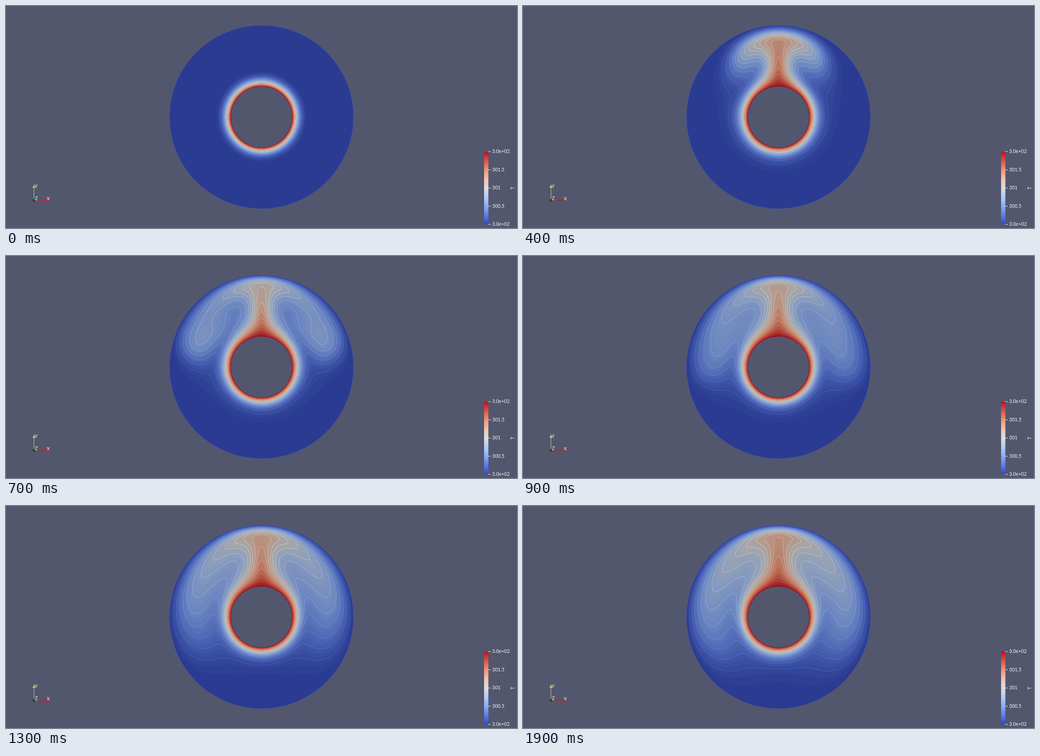
An HTML page with a canvas that plays this animation: 1133x494 px, repeating every 2000 ms.

```html
<!DOCTYPE html>
<html lang="en">
<head>
<meta charset="utf-8">
<title>Natural convection in an annulus</title>
<style>
  html, body { margin: 0; width: 100%; height: 100%; overflow: hidden; background: #52576e; }
  canvas, svg { position: absolute; left: 0; top: 0; display: block; }
  text { font: 10.6px Lato, "Open Sans", sans-serif; fill: #f4f4f6; }
</style>
</head>
<body>
<canvas id="stage" width="1133" height="494"></canvas>
<svg width="1133" height="494" viewBox="0 0 1133 494">
  <g id="bar"></g>
  <text transform="translate(1127 408.4) rotate(-90)">T</text>
  <g stroke-width="1">
    <path d="M62 432V404" stroke="#c9c9a4"/>
    <path d="M62 432.5H91" stroke="#d01818"/>
  </g>
  <path d="M62 397.5L65 404.5H59Z" fill="#e6dc14"/>
  <path d="M97.5 432.5L89 429.5V435.5Z" fill="#c01414"/>
  <circle cx="62" cy="432.5" r="3.2" fill="#0c5a1c"/>
  <text x="63.5" y="405">Y</text>
  <text x="90.3" y="433">X</text>
  <text x="64" y="432">Z</text>
</svg>
<script>
const CX = 566.5, CY = 247, R_IN = 68, R_OUT = 204;
const FRAMES = 20, HOLD = 100;

// Grid in (ln r, angle from the top); both directions share the spacing h.
const M = 42, N = 120, S = N + 1, K = 40, h = Math.PI / N;
const PR = 0.7, RAYLEIGH = 4000, G = RAYLEIGH * PR, DT = 1.5e-4;
const SIZE = (M + 1) * S;
const grid = () => new Float64Array(SIZE);
const radius = Float64Array.from({ length: M + 1 }, (_, i) => Math.exp(i * h));
const sines = Array.from({ length: K }, (_, k) =>
  Float64Array.from({ length: S }, (_, j) => Math.sin((k + 1) * j * h)));
const cosine = Float64Array.from({ length: S }, (_, j) => Math.cos(j * h));

// Tridiagonal factors for every angular mode.
const factors = sines.map((_, k) => {
  const d = 2 + ((k + 1) * h) ** 2, f = new Float64Array(M + 1);
  for (let i = 1; i < M; i++) f[i] = -1 / (d + f[i - 1]);
  return f;
});

let temp, tempNext, vort, vortNext, psi;

function reset() {
  [temp, tempNext, vort, vortNext, psi] = Array.from({ length: 5 }, grid);
  temp.fill(1, 0, S);
  tempNext.fill(1, 0, S);
}

// Stream function from vorticity: sine series in angle, direct solve in ln r.
const coef = new Float64Array(M + 1);
function solvePsi() {
  psi.fill(0);
  for (let k = 0; k < K; k++) {
    const sn = sines[k], f = factors[k];
    coef[0] = coef[M] = 0;
    for (let i = 1; i < M; i++) {
      let sum = 0;
      const row = i * S;
      for (let j = 1; j < N; j++) sum += sn[j] * vort[row + j];
      const b = -sum * radius[i] ** 2 * h * h * 2 / N;
      coef[i] = (b - coef[i - 1]) * f[i];
    }
    for (let i = M - 1; i > 0; i--) {
      const a = coef[i] -= f[i] * coef[i + 1], row = i * S;
      for (let j = 1; j < N; j++) psi[row + j] += a * sn[j];
    }
  }
}

function step() {
  const last = M * S, sn = sines[0];
  for (let j = 1; j < N; j++) {
    vort[j] = -2 * psi[S + j] / (h * h);
    vort[last + j] = -2 * psi[last - S + j] / (h * radius[M]) ** 2;
  }
  for (let i = 1; i < M; i++) {
    const g = DT / (radius[i] * h) ** 2, lift = DT * G / (radius[i] * h);
    for (let j = 0; j <= N; j++) {
      const c = i * S + j, up = c + S, dn = c - S;
      const lo = j ? c - 1 : c + 1, hi = j < N ? c + 1 : c - 1;
      const px = (psi[up] - psi[dn]) / 2;
      const pt = j === 0 ? psi[hi] : j === N ? -psi[lo] : (psi[hi] - psi[lo]) / 2;
      const tx = (temp[up] - temp[dn]) / 2, tt = (temp[hi] - temp[lo]) / 2;
      const lapT = temp[up] + temp[dn] + temp[hi] + temp[lo] - 4 * temp[c];
      tempNext[c] = temp[c] + g * (px * tt - pt * tx + lapT);
      if (j === 0 || j === N) continue;
      const wx = (vort[up] - vort[dn]) / 2, wt = (vort[hi] - vort[lo]) / 2;
      const lapW = vort[up] + vort[dn] + vort[hi] + vort[lo] - 4 * vort[c];
      vortNext[c] = vort[c] + g * (px * wt - pt * wx + PR * lapW)
        - lift * (tx * sn[j] + tt * cosine[j]);
    }
  }
  [temp, tempNext] = [tempNext, temp];
  [vort, vortNext] = [vortNext, vort];
  solvePsi();
}

// Pixel radius of the outermost 5 % isotherm along one ray.
function reach(j) {
  let i = M - 1;
  while (i > 0 && temp[i * S + j] < 0.05) i--;
  const a = temp[i * S + j], b = temp[(i + 1) * S + j];
  return R_IN * Math.exp((i + (a - 0.05) / (a - b)) * h);
}

function simulate() {
  // Pace: heat first spreads to r = 94 at the side, two intervals later the plume is at r = 146.
  reset();
  let n = 0;
  while (n < 220 && !(reach(N / 2) >= 94)) { step(); n++; }
  const first = n;
  while (n < first + 600 && !(reach(0) >= 146)) { step(); n++; }
  const gap = Math.max(80, Math.round((n - first) / 2));

  reset();
  const out = [];
  for (let f = 0; f < FRAMES; f++) {
    for (let k = f ? gap : first; k > 0; k--) step();
    out.push(Float32Array.from(temp));
  }
  return out;
}

// Cool-to-warm colour scale.
const scale = [
  [56, 78, 192], [98, 130, 234], [141, 176, 254], [184, 208, 249], [221, 221, 221],
  [244, 196, 173], [244, 154, 123], [224, 92, 74], [204, 18, 38]
];
function colour(t) {
  const p = Math.min(Math.max(t, 0), 1) * 8, i = Math.min(7, Math.floor(p));
  return scale[i].map((v, n) => v + (scale[i + 1][n] - v) * (p - i));
}
const ramp = (count) => Array.from({ length: count }, (_, i) => colour(i / (count - 1)));
const BANDS = 64, LEVELS = 20, SHADE = 0.755;
const bands = ramp(BANDS).map((c) => c.map((v) => v * SHADE));
const lineColours = ramp(LEVELS + 1);

// Grid position of every pixel in the square around the ring.
const W = 413, X0 = 360, Y0 = 41;
const ringU = new Float32Array(W * W), ringV = new Float32Array(W * W);
for (let y = 0, p = 0; y < W; y++) {
  for (let x = 0; x < W; x++, p++) {
    const dx = X0 + x + 0.5 - CX, dy = Y0 + y + 0.5 - CY;
    const u = Math.log(Math.max(1, Math.hypot(dx, dy) / R_IN)) / h;
    ringU[p] = Math.min(u, M - 0.001);
    ringV[p] = Math.min(Math.atan2(Math.abs(dx), -dy) / h, N - 0.001);
  }
}

const ctx = document.getElementById("stage").getContext("2d");
const layer = document.createElement("canvas");
layer.width = layer.height = W;
const layerCtx = layer.getContext("2d");
const image = layerCtx.createImageData(W, W);
const values = new Float32Array(W * W);

function paintField(field) {
  for (let p = 0; p < W * W; p++) {
    const i = Math.floor(ringU[p]), j = Math.floor(ringV[p]);
    const a = ringU[p] - i, b = ringV[p] - j, c = i * S + j;
    values[p] = (1 - a) * ((1 - b) * field[c] + b * field[c + 1])
      + a * ((1 - b) * field[c + S] + b * field[c + S + 1]);
  }
  const data = image.data;
  for (let p = 0; p < W * W; p++) {
    const t = Math.min(Math.max(values[p], 0), 1);
    const gx = (values[p + 1] - values[p - 1]) / 2 || 0;
    const gy = (values[p + W] - values[p - W]) / 2 || 0;
    const slope = Math.max(Math.sqrt(gx * gx + gy * gy), 0.0007);
    const level = Math.round(t * LEVELS);
    const inside = level > 0 && level < LEVELS;
    const ink = inside ? 0.6 * Math.max(0, 1 - Math.abs(t - level / LEVELS) / slope) : 0;
    const base = bands[Math.min(BANDS - 1, Math.floor(t * BANDS))], line = lineColours[level];
    for (let n = 0; n < 3; n++) data[p * 4 + n] = base[n] + (line[n] - base[n]) * ink;
    data[p * 4 + 3] = 255;
  }
  layerCtx.putImageData(image, 0, 0);
}

function circle(r, stroke) {
  ctx.beginPath();
  ctx.arc(CX, CY, r, 0, 2 * Math.PI);
  ctx.strokeStyle = stroke;
  ctx.stroke();
}

function draw(field) {
  paintField(field);
  ctx.fillStyle = "#52576e";
  ctx.fillRect(0, 0, 1133, 494);
  ctx.save();
  ctx.beginPath();
  ctx.arc(CX, CY, R_OUT, 0, 2 * Math.PI);
  ctx.moveTo(CX + R_IN, CY);
  ctx.arc(CX, CY, R_IN, 0, 2 * Math.PI);
  ctx.clip("evenodd");
  ctx.drawImage(layer, X0, Y0);
  ctx.restore();
  ctx.lineWidth = 1;
  circle(R_OUT - 0.3, "rgba(59,76,180,0.8)");
  circle(R_IN, "rgba(120,35,60,0.5)");
}

function buildBar() {
  const top = 324, height = 162, blocks = ramp(32), step = height / blocks.length;
  let svg = "";
  blocks.forEach((c, i) => {
    const y = top + height - (i + 1) * step;
    svg += `<rect x="1060" y="${y}" width="9.5" height="${step + 0.2}" fill="rgb(${c.map(Math.round)})"/>`;
  });
  ["3.0e+02", "301.5", "301", "300.5", "3.0e+02"].forEach((label, i) => {
    const y = top + i * height / 4;
    svg += `<path d="M1068.5 ${y}H1075" stroke="#f0f0f2"/><text x="1078" y="${y + 3}">${label}</text>`;
  });
  document.getElementById("bar").innerHTML = svg;
}

buildBar();
const frames = simulate();
let shown = 0;
draw(frames[0]);
const start = performance.now();

function tick() {
  const index = Math.floor(Math.max(0, performance.now() - start) / HOLD) % FRAMES;
  if (index !== shown) draw(frames[shown = index]);
  requestAnimationFrame(tick);
}
requestAnimationFrame(tick);
</script>
</body>
</html>
```
